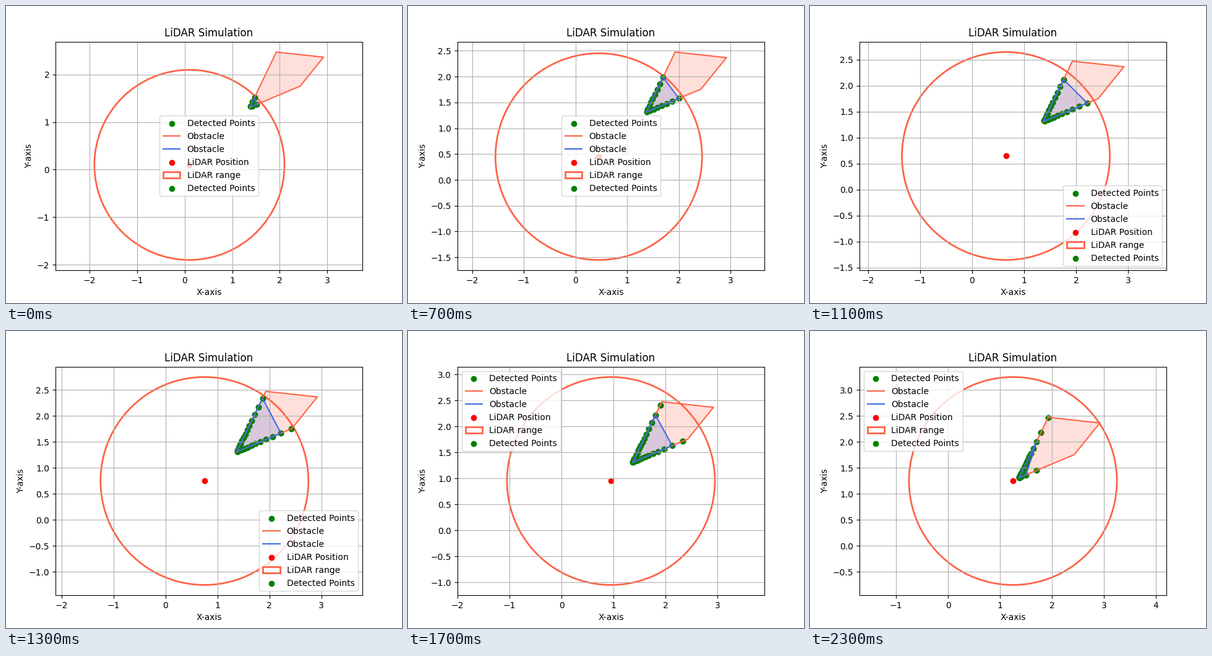
These frames come from a looping animation (640x480 px, 2.4 s). A matplotlib script:

```python
import numpy as np
import matplotlib.pyplot as plt
from matplotlib.animation import FuncAnimation
from matplotlib.patches import Circle

FRAMES = 24
INTERVAL = 100
RANGE = 2.0
MAX_GAP = 0.2
OBSTACLE = np.array([(1.37, 1.312), (1.929, 2.475), (2.922, 2.367), (2.43, 1.757)])


def cross(a, b):
    return a[0] * b[1] - a[1] * b[0]


def cast(pos, angle):
    """Nearest hit of one ray on the obstacle, or None when out of range."""
    ray = np.array([np.cos(angle), np.sin(angle)])
    best = RANGE
    hit = None
    for a, b in zip(OBSTACLE, np.roll(OBSTACLE, -1, axis=0)):
        edge = b - a
        det = cross(ray, edge)
        if abs(det) < 1e-12:
            continue
        dist = cross(a - pos, edge) / det
        along = cross(a - pos, ray) / det
        if 0 <= along <= 1 and 0 < dist <= best:
            best, hit = dist, pos + dist * ray
    return hit


def scan(pos):
    hits = (cast(pos, a) for a in np.radians(np.arange(360)))
    return np.array([h for h in hits if h is not None])


def main_cluster(points):
    gaps = np.hypot(*np.diff(points, axis=0).T)
    groups = np.split(points, np.flatnonzero(gaps > MAX_GAP) + 1)
    return max(groups, key=len)


def half_hull(points):
    hull = []
    for p in points:
        while len(hull) > 1 and cross(hull[-1] - hull[-2], p - hull[-2]) <= 0:
            hull.pop()
        hull.append(p)
    return hull[:-1]


def convex_hull(points):
    pts = points[np.lexsort((points[:, 1], points[:, 0]))]
    return np.array(half_hull(pts) + half_hull(pts[::-1]))


def draw_shape(corners, color):
    x, y = np.vstack([corners, corners[:1]]).T
    ax.plot(x, y, color=color, label="Obstacle")
    ax.fill(x, y, color=color, alpha=0.2)


def draw_points(points):
    ax.scatter(*points.T, color="green", label="Detected Points")


def update(i):
    ax.clear()
    pos = np.full(2, 0.1 + 0.05 * i)
    points = scan(pos)

    draw_points(points)
    draw_shape(OBSTACLE, "tomato")
    draw_shape(convex_hull(main_cluster(points)), "royalblue")
    ax.scatter(*pos, color="red", label="LiDAR Position")
    ax.add_patch(Circle(pos, RANGE, fill=False, color="tomato",
                        linewidth=2, label="LiDAR range"))
    draw_points(points)

    ax.set_title("LiDAR Simulation")
    ax.set_xlabel("X-axis")
    ax.set_ylabel("Y-axis")
    ax.grid(True)
    ax.axis("equal")
    ax.legend(loc="best")


fig, ax = plt.subplots(figsize=(6.4, 4.8), dpi=100)
anim = FuncAnimation(fig, update, frames=FRAMES, interval=INTERVAL,
                     init_func=lambda: None, repeat=True, repeat_delay=0)
plt.show()
```
